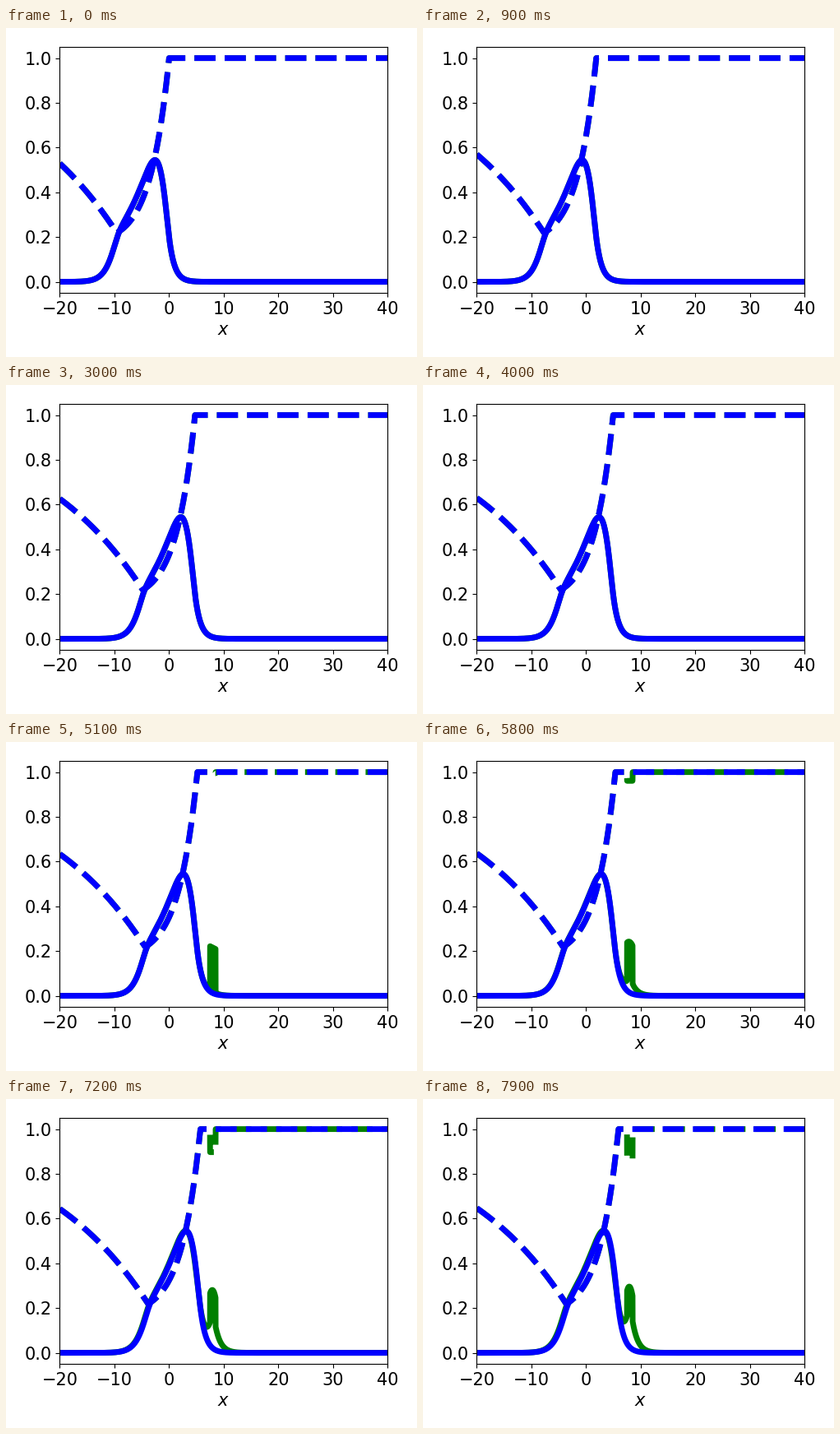
A matplotlib script that plays this animation: 500x400 px, repeating every 8000 ms.

```python
import numpy as np
import matplotlib.pyplot as plt
from matplotlib.animation import FuncAnimation

# Travelling pulse in a neural field with synaptic depression
THETA, ALPHA, BETA = 0.2, 20.0, 0.25
SPEED, WIDTH = 1.0301, 9.55
Q_MIN = 1 / (1 + ALPHA * BETA)
RATE = (1 + ALPHA * BETA) / ALPHA
L = SPEED / RATE
Q_BACK = (1 - Q_MIN) * np.exp(-WIDTH / L)

# Kick that lifts the activity on a short interval
KICK_TIME, KICK, KICK_LEFT, KICK_RIGHT = 5.0, 0.2, 7.5, 8.5

FRAMES, INTERVAL = 80, 100
x = np.linspace(-20, 40, 3001)


def resource(z):
    """Synaptic resource of the pulse, front at z = 0."""
    active = Q_MIN + (1 - Q_MIN) * np.exp(np.minimum(z, 0) / L)
    s = np.minimum(z + WIDTH, 0)
    resting = 1 - (1 - Q_MIN - Q_BACK) * np.exp(s / (SPEED * ALPHA))
    return np.where(z > 0, 1.0, np.where(z > -WIDTH, active, resting))


def middle(z):
    """Activity between the back and the front of the pulse."""
    slow = (1 - Q_MIN) / ((1 - 1 / L**2) * (1 - SPEED / L))
    front = 0.5 * (Q_MIN + (1 - Q_MIN) * L / (L - 1)) / (SPEED - 1)
    back = 0.5 * (Q_MIN + Q_BACK * L / (L + 1)) / (1 + SPEED)
    free = THETA - Q_MIN - slow - front
    return (Q_MIN + slow * np.exp(z / L) + front * np.exp(z)
            + free * np.exp(z / SPEED) - back * np.exp(-(z + WIDTH)))


def activity(z):
    """Synaptic drive of the pulse, front at z = 0."""
    ahead = THETA * np.exp(-np.maximum(z, 0))
    inside = middle(np.clip(z, -WIDTH, 0))
    s = np.minimum(z + WIDTH, 0)
    k = 1 / L - 1
    drive = 0.5 * (Q_MIN * (1 - np.exp(-WIDTH))
                   + Q_BACK * (np.exp(WIDTH * k) - 1) / k) / (1 - SPEED)
    behind = (drive * np.exp(s)
              + (middle(-WIDTH) - drive) * np.exp(s / SPEED))
    return np.where(z > 0, ahead, np.where(z > -WIDTH, inside, behind))


def ramp(d):
    """Integral of the kernel exp(-|y|)/2 from 0 to d."""
    return 0.5 * np.sign(d) * (1 - np.exp(-np.abs(d)))


KICKED = (x >= KICK_LEFT) & (x <= KICK_RIGHT)
SPREAD = ramp(x - KICK_LEFT) - ramp(x - KICK_RIGHT)


def kick_response(s, front):
    """Extra activity a time s after the kick."""
    decay = np.exp(-s)
    gain = (Q_MIN * (1 - decay)
            + (1 - Q_MIN) * (np.exp(-RATE * s) - decay) / (1 - RATE))
    pull = 0.07 * s**2 + 0.06 * s**3
    return (KICK * decay * KICKED + gain * SPREAD
            + 0.5 * pull * np.exp(-np.abs(x - front)))


def clock(frame):
    """Coarse time steps first, fine ones around the kick."""
    return min(0.2 * frame, 4.6 + 0.02 * (frame - 30))


plt.rcParams.update({"font.family": "DejaVu Sans", "font.size": 15})
fig = plt.figure(figsize=(5, 4), dpi=100, facecolor="white")
ax = fig.add_axes([0.1308, 0.1945, 0.798, 0.748])
ax.set(xlim=(-20, 40), ylim=(-0.05, 1.05), xlabel="$x$")
ax.set_xticks(range(-20, 41, 10))
ax.set_yticks(np.arange(0, 1.1, 0.2))

(full_u,) = ax.plot([], [], "g-", lw=5)
(full_q,) = ax.plot([], [], "g--", lw=5)
(wave_u,) = ax.plot([], [], "b-", lw=5)
(wave_q,) = ax.plot([], [], "b--", lw=5)


def update(frame):
    t = clock(frame)
    s = max(t - KICK_TIME, 0)
    front = SPEED * t
    shifted = x - front - 0.15 * s - 0.27 * s**2
    u, q = activity(shifted), resource(shifted)
    wave_u.set_data(x, u)
    wave_q.set_data(x, q)
    if t > KICK_TIME - 1e-6:
        u = activity(x - front) + kick_response(s, front)
        drained = Q_MIN + (1 - Q_MIN) * np.exp(-RATE * s)
        q = np.where(KICKED, drained, q)
    full_u.set_data(x, u)
    full_q.set_data(x, q)
    return full_u, full_q, wave_u, wave_q


anim = FuncAnimation(fig, update, frames=FRAMES, interval=INTERVAL,
                     repeat=True, repeat_delay=0, blit=False)
plt.show()
```
